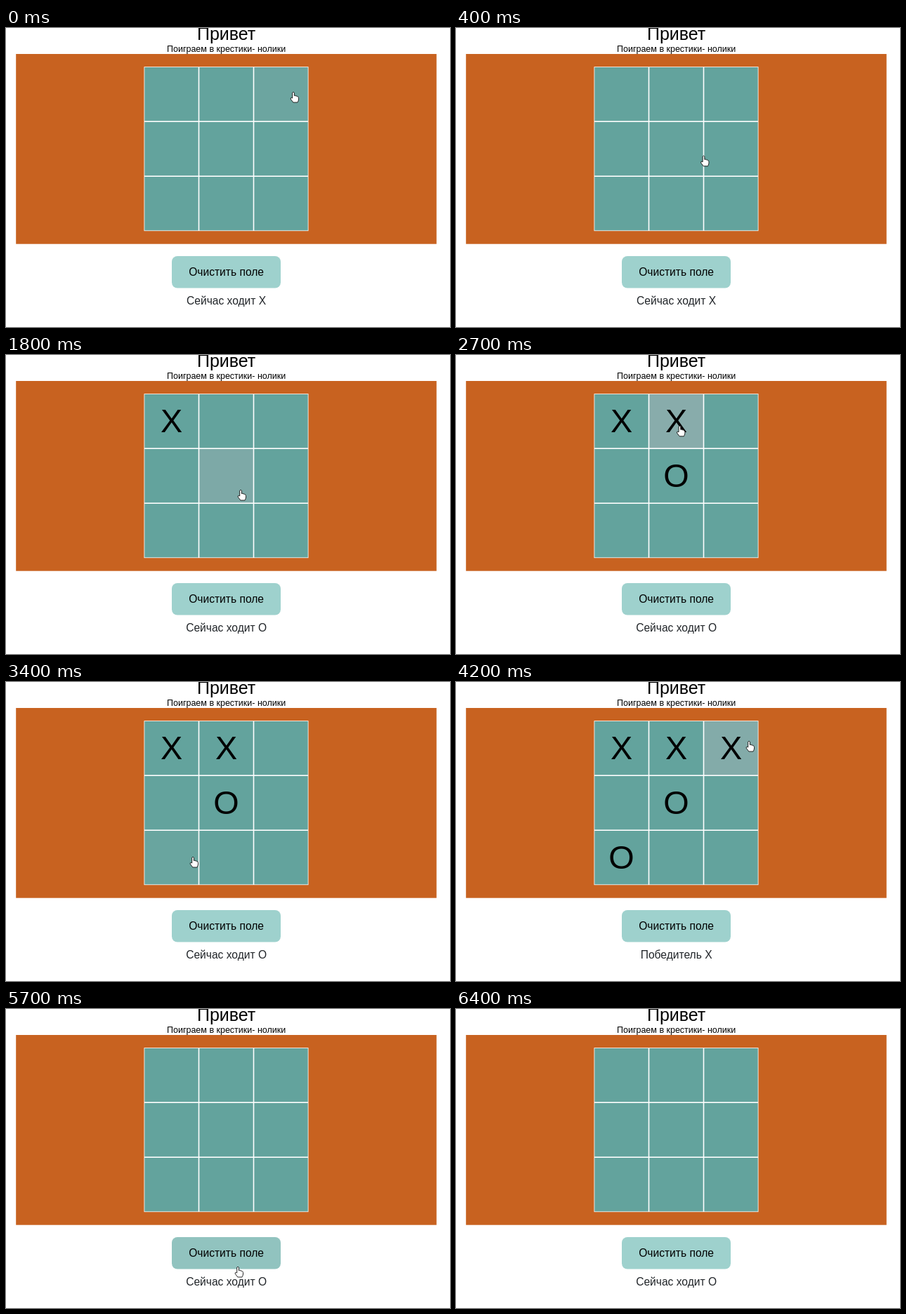
These frames come from a looping animation (632 by 426 pixels, 7.2 s). An HTML page with a canvas:

```html
<!DOCTYPE html>
<html lang="ru">
<head>
<meta charset="utf-8">
<style>
  html, body { margin: 0; width: 100%; height: 100%; overflow: hidden; background: #fff; }
  canvas { display: block; width: 632px; height: 426px; }
</style>
</head>
<body>
<canvas></canvas>
<script>
const W = 632, H = 426, LOOP = 7200, STEP = 100, LAST = 6400;
const canvas = document.querySelector('canvas');
const ctx = canvas.getContext('2d');
const scale = window.devicePixelRatio || 1;
canvas.width = W * scale;
canvas.height = H * scale;

const CENTER = 313.6;
const GRID = { x: 196.5, y: 55.2, cell: 78, border: 0.8 };
const BUTTON = { x: 236, y: 325, w: 155, h: 45.5 };
const CELL = [99, 163, 157], CELL_HOVER = [136, 172, 171];
const BTN = [158, 209, 205], BTN_HOVER = [144, 194, 190];
const FADE = 500, BUTTON_ID = 9, NOTHING = -1;

// Each click puts the next mark, X first, into the cell under the pointer.
const CLICKS = [1400, 2000, 2600, 3600, 4100], CLEARED = 5700, CURSOR_GONE = 6200;

// Key points of the pointer tip: time, x, y
const PATH = [
  [-100, 440, 62], [0, 409, 91], [700, 310, 250], [1000, 270, 184], [1400, 236, 92],
  [1800, 334, 192], [2600, 322, 85], [3200, 300, 180], [3400, 266, 249], [3650, 245, 252],
  [3950, 400, 92], [4200, 417, 84], [4600, 418, 28], [4900, 456, 150], [5100, 443, 299.5],
  [5500, 330, 367]
];

const HAND = new Path2D('M-1.3 9V1.2Q0 -.8 1.4 1.2V5.5Q3 4.6 4 6Q5.6 5.4 6.3 7Q7.5 7 7.5 8.5V11' +
  'Q7 13.5 6 15H-.2L-3.8 10.2Q-4 8 -2.6 8.4Z');
const ARROW = new Path2D('M0 0V10.5L2.4 8.2L4 11.8L5.6 11L4.1 7.6H7.4Z');

function pointer(t) {
  const next = PATH.findIndex(p => p[0] > t);
  if (next < 1) return PATH.at(next).slice(1);
  const [t0, x0, y0] = PATH[next - 1], [t1, x1, y1] = PATH[next];
  const k = (t - t0) / (t1 - t0);
  return [x0 + (x1 - x0) * k, y0 + (y1 - y0) * k];
}

function targetAt(t) {
  if (t >= CURSOR_GONE) return NOTHING;
  const [x, y] = pointer(t);
  const col = Math.floor((x - GRID.x) / GRID.cell), row = Math.floor((y - GRID.y) / GRID.cell);
  if (col >= 0 && col < 3 && row >= 0 && row < 3) return row * 3 + col;
  const { x: bx, y: by, w, h } = BUTTON;
  return x >= bx && x < bx + w && y >= by && y < by + h ? BUTTON_ID : NOTHING;
}

// Hover colours ease in and drop out at once.
function hoverAmount(t, id) {
  let age = 0;
  while (age < FADE && targetAt(t - age) === id) age += 5;
  return 1 - (1 - Math.min(1, age / FADE)) ** 1.8;
}

const mix = (a, b, k) => `rgb(${a.map((v, i) => Math.round(v + (b[i] - v) * k))})`;
const markOf = turn => turn % 2 ? 'O' : 'X';
const cellCorner = i => [GRID.x + i % 3 * GRID.cell, GRID.y + Math.floor(i / 3) * GRID.cell];

function text(str, x, baseline, size, color = '#000') {
  ctx.font = `${size}px "Liberation Sans", Arial, sans-serif`;
  ctx.fillStyle = color;
  ctx.fillText(str, x, baseline);
}

function status(t, turn) {
  if (t >= CLEARED) return 'Сейчас ходит O';
  if (turn === CLICKS.length) return 'Победитель X';
  return 'Сейчас ходит ' + markOf(turn);
}

function drawBoard(target, hover, clicks) {
  const { cell, border } = GRID;
  ctx.fillStyle = '#fff';
  ctx.fillRect(GRID.x, GRID.y, 3 * cell, 3 * cell);
  for (let i = 0; i < 9; i++) {
    const [x, y] = cellCorner(i);
    ctx.fillStyle = mix(CELL, CELL_HOVER, i === target ? hover : 0);
    ctx.fillRect(x + border, y + border, cell - 2 * border, cell - 2 * border);
  }
  clicks.forEach((time, turn) => {
    const [x, y] = cellCorner(targetAt(time));
    text(markOf(turn), x + cell / 2, y + 54.6, 46.8);
  });
}

function drawPointer(t, target) {
  const shape = target === NOTHING ? ARROW : HAND;
  ctx.save();
  ctx.translate(...pointer(t));
  ctx.fillStyle = '#fff';
  ctx.strokeStyle = '#111';
  ctx.lineWidth = 0.9;
  ctx.lineJoin = 'round';
  ctx.fill(shape);
  ctx.stroke(shape);
  ctx.restore();
}

function draw(t) {
  const target = targetAt(t);
  const hover = target === NOTHING ? 0 : hoverAmount(t, target);
  const played = CLICKS.filter(time => time <= t);

  ctx.setTransform(scale, 0, 0, scale, 0, 0);
  ctx.textAlign = 'center';
  ctx.fillStyle = '#fff';
  ctx.fillRect(0, 0, W, H);

  text('Привет', CENTER, 17, 25);
  text('Поиграем в крестики- нолики', CENTER, 33.7, 12.5);

  ctx.fillStyle = '#c86220';
  ctx.fillRect(14.2, 37, 598.6, 270.7);
  drawBoard(target, hover, t < CLEARED ? played : []);

  ctx.fillStyle = mix(BTN, BTN_HOVER, target === BUTTON_ID ? hover : 0);
  ctx.beginPath();
  ctx.roundRect(BUTTON.x, BUTTON.y, BUTTON.w, BUTTON.h, 8);
  ctx.fill();
  text('Очистить поле', CENTER, 353.4, 15.6);
  text(status(t, played.length), CENTER, 394, 15.6, '#212529');

  if (t < CURSOR_GONE) drawPointer(t, target);
}

const start = performance.now();
function frame() {
  const t = (performance.now() - start) % LOOP;
  draw(Math.min(LAST, Math.floor(t / STEP) * STEP));
  requestAnimationFrame(frame);
}
frame();
</script>
</body>
</html>
```
